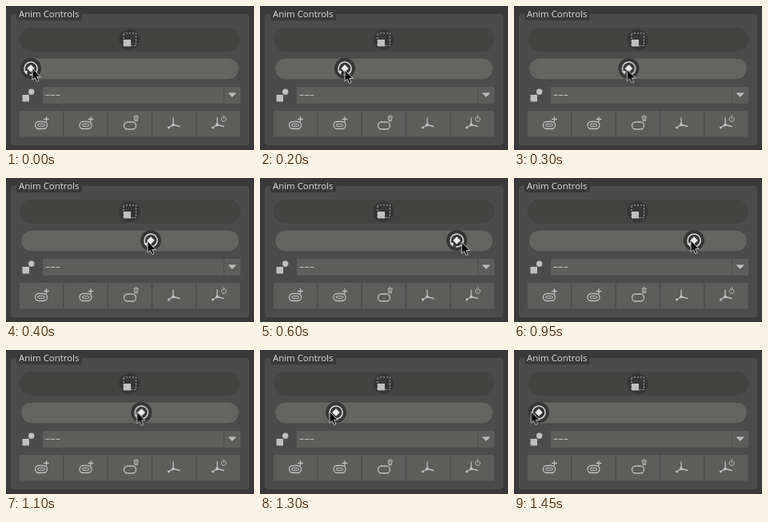
An HTML page that plays this animation: 310 by 180 pixels, repeating every 1550 ms.

```html
<!DOCTYPE html>
<html lang="en">
<head>
<meta charset="utf-8">
<title>Anim Controls</title>
<style>
  html, body { margin: 0; width: 100%; height: 100%; overflow: hidden; background: #393939; }
  svg { display: block; width: 310px; height: 180px; }
  text { font-family: "Open Sans", "Noto Sans", sans-serif; fill: #dedede; }
  .btn { fill: #5d5d5b; }
  .disc { fill: #363636; }
  .fill { fill: #c0c0c0; }
  .line { fill: none; stroke: #c0c0c0; stroke-width: 1.3; stroke-linecap: round; stroke-linejoin: round; }
  .thin { stroke-width: 1; }
  #knob { animation: knob 1550ms infinite; }
  #cursor { animation: cursor 1550ms infinite; }

  /* Positions advance every 50 ms */
  @keyframes knob {
    0%      { transform: translate(31px, 78px);  animation-timing-function: steps(4); }
    12.9%   { transform: translate(106px, 78px); animation-timing-function: steps(4); }
    25.8%   { transform: translate(181px, 78px); animation-timing-function: steps(3); }
    35.48%  { transform: translate(235px, 78px); animation-timing-function: steps(1); }
    38.7%   { transform: translate(246px, 78px); animation-timing-function: steps(1); }
    41.93%  { transform: translate(279px, 78px); animation-timing-function: steps(1); }
    51.61%  { transform: translate(275px, 78px); animation-timing-function: steps(3); }
    61.29%  { transform: translate(225px, 78px); animation-timing-function: steps(7); }
    83.87%  { transform: translate(95px, 78px);  animation-timing-function: steps(3); }
    93.54%, 100% { transform: translate(31px, 78px); }
  }
  @keyframes cursor {
    0%      { transform: translate(33px, 78px);  animation-timing-function: steps(4); }
    12.9%   { transform: translate(106px, 80px); animation-timing-function: steps(4); }
    25.8%   { transform: translate(177px, 79px); animation-timing-function: steps(3); }
    35.48%  { transform: translate(233px, 80px); animation-timing-function: steps(1); }
    38.7%   { transform: translate(252px, 80px); animation-timing-function: steps(1); }
    41.93%  { transform: translate(290px, 80px); animation-timing-function: steps(1); }
    51.61%  { transform: translate(279px, 80px); animation-timing-function: steps(3); }
    61.29%  { transform: translate(221px, 78px); animation-timing-function: steps(7); }
    83.87%  { transform: translate(87px, 77px);  animation-timing-function: steps(3); }
    93.54%, 100% { transform: translate(21.5px, 77px); }
  }
</style>
</head>
<body>
<svg viewBox="0 0 310 180">
  <defs>
    <rect id="loop" class="line" x="-7.5" y="-4.5" width="15" height="9" rx="4.5"/>
    <g id="addLoop">
      <use href="#loop"/>
      <rect class="line thin" x="-4.3" y="-1.4" width="8.6" height="2.8" rx="1.4"/>
      <path d="M6.5-11V-4.5M3-7.5H10" stroke="#5d5d5b" stroke-width="2.6"/>
      <path class="line" d="M6.5-10.3V-4.7M3.7-7.5H9.3"/>
    </g>
    <g id="axes">
      <path class="line" d="M0 0V-8.5M0 0L8 2M0 0L-6 3.8"/>
      <circle class="fill" r="2"/>
      <circle class="fill" cx="-5.5" cy="3.6" r="1.5"/>
    </g>
  </defs>

  <rect width="310" height="180" fill="#393939"/>
  <rect x="6.5" y="10.5" width="297" height="163" rx="3" fill="#4b4b4c" stroke="#4e4e4f"/>
  <rect x="13" y="3" width="82" height="15" rx="2" fill="#393939"/>
  <text x="16" y="14" font-size="11.4">Anim Controls</text>

  <!-- Scale slider -->
  <rect x="17" y="27" width="276" height="30" rx="15" fill="#434342"/>
  <circle class="disc" cx="154.5" cy="42" r="13"/>
  <rect x="147" y="34" width="15.5" height="15.5" fill="none" stroke="#adadad" stroke-width="1.1" stroke-dasharray="2 2" stroke-dashoffset="1"/>
  <rect class="fill" x="147" y="42" width="9" height="8.5"/>

  <!-- Rotate slider -->
  <rect x="18.5" y="65" width="273" height="27" rx="13.5" fill="#646461" stroke="#474746"/>
  <g id="knob">
    <circle class="disc" r="13"/>
    <path d="M-1.4 7.9A8 8 0 1 0-7.3 3.2" fill="none" stroke="#dadada" stroke-width="1.5"/>
    <path d="M-9.2 3.4L-4 2.8L-4.8 8Z" fill="#dadada"/>
    <path d="M0-4.8L4.8 0L0 4.8L-4.8 0Z" fill="#ececec"/>
  </g>

  <!-- Target menu -->
  <rect class="fill" x="20.5" y="111" width="8.5" height="8.5"/>
  <circle class="fill" cx="31.7" cy="107.3" r="3.7"/>
  <rect class="btn" x="46" y="101" width="247" height="21" rx="1"/>
  <path d="M272.5 101V122" stroke="#4c4c4b"/>
  <path d="M49.5 111.5H54.5M56 111.5H61M62.5 111.5H67.5" stroke="#c4c4c4" stroke-width="1.1"/>
  <path d="M277.5 108.5H288L282.7 114Z" fill="#bdbdbd"/>

  <!-- Actions -->
  <g class="btn">
    <rect x="17" y="131" width="54" height="32.5"/>
    <rect x="72.4" y="131" width="54" height="32.5"/>
    <rect x="127.8" y="131" width="54" height="32.5"/>
    <rect x="183.2" y="131" width="54" height="32.5"/>
    <rect x="238.6" y="131" width="54" height="32.5"/>
  </g>
  <use href="#addLoop" x="44" y="149"/>
  <use href="#addLoop" x="99.5" y="149"/>
  <use href="#loop" x="155" y="149.5"/>
  <path class="line thin" d="M159.8 138.2H165.6M161.8 137H163.6M160.5 139.5L161 143.6H164.4L164.9 139.5M162.7 140V142.5"/>
  <use href="#axes" x="209" y="148.5"/>
  <use href="#axes" x="264" y="148.5"/>
  <path class="line thin" d="M270.6 138.8A3 3 0 1 0 273.8 138.8M272.2 137V140.3"/>

  <path id="cursor" d="M0 0V14.4L3.2 11.4L5.5 16.6L8 15.5L5.8 10.5H10.2Z" fill="#0a0a0a" stroke="#c4c4c4" stroke-width="1"/>
</svg>
</body>
</html>
```
